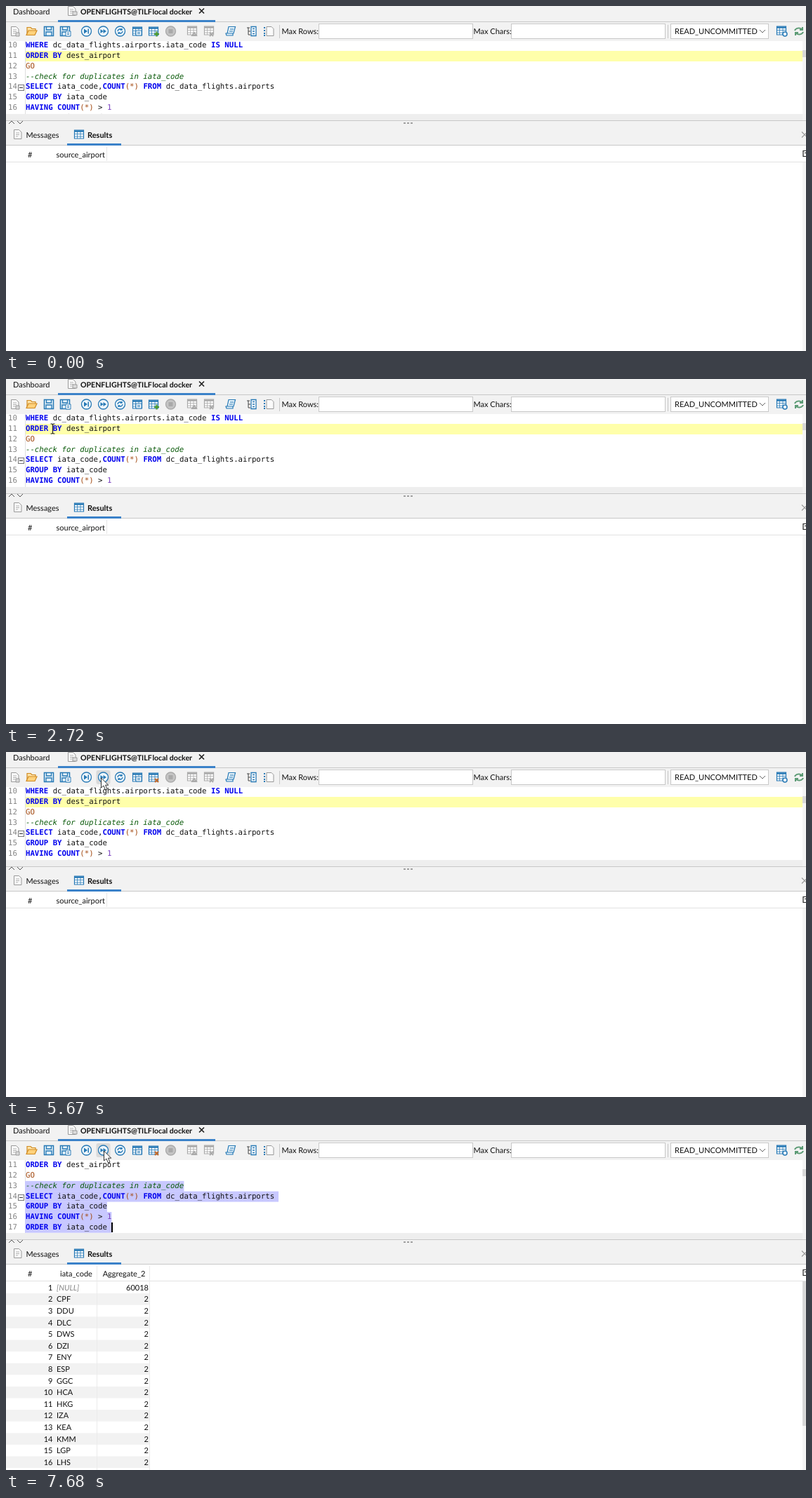
An HTML page with a canvas that plays this animation: 1139x492 px, repeating every 8 s.

```html
<!DOCTYPE html>
<html lang="en">
<head>
<meta charset="utf-8">
<title>SQL editor</title>
<style>
  html, body { margin: 0; width: 1139px; height: 492px; overflow: hidden; }
  canvas { display: block; }
</style>
</head>
<body>
<canvas id="stage" width="1139" height="492"></canvas>
<script>
const ctx = document.getElementById('stage').getContext('2d');
const LOOP = 8000;
const UI = 'Lato, "Open Sans", sans-serif';
const MONO = '"DejaVu Sans Mono", monospace';
const BLUE = '#2779b5', GRAY = '#a9a9a9', PANEL = '#f2f2f2', LINE = '#c8c8c8';
const COL = 6.44, ROW = 14.72, GRID = 16.6;

const CODE = [
  'WHERE dc_data_flights.airports.iata_code IS NULL',
  'ORDER BY dest_airport',
  'GO',
  '--check for duplicates in iata_code',
  'SELECT iata_code,COUNT(*) FROM dc_data_flights.airports',
  'GROUP BY iata_code',
  'HAVING COUNT(*) > 1',
  'ORDER BY iata_code '
];
const CODES = '[NULL] CPF DDU DLC DWS DZI ENY ESP GGC HCA HKG IZA KEA KMM LGP LHS'.split(' ');
const KEYWORD = /^(WHERE|IS|NULL|ORDER|BY|SELECT|COUNT|FROM|GROUP|HAVING)$/;

// start, end, steps, from, to, easing powers for x and y
const MOVES = [
  [270, 740, 8, [978, 480], [135, 154], 3, 1.5],
  [810, 950, 3, [135, 154], [117, 122], 1.3, 1.3],
  [1210, 1650, 7, [117, 122], [115, 36], 1.4, 1.4],
  [2170, 2720, 9, [115, 36], [66.5, 71], 1.6, 1.6],
  [2990, 3680, 11, [66.5, 71], [115, 36.5], 1.6, 1.6],
  [5610, 5810, 4, [115, 36.5], [139, 36.5], 2.6, 2]
];
const CARET = [[2920, 3480], [3940, 4400], [4880, 5410], [5950, 6410], [6610, 7220], [7680, LOOP]];
const within = (t, a, b) => t >= a && t < b;

function rect(x, y, w, h, color) {
  ctx.fillStyle = color;
  ctx.fillRect(x, y, w, h);
}

function box(x, y, w, h, fill, stroke) {
  rect(x, y, w, h, fill);
  ctx.strokeStyle = stroke;
  ctx.lineWidth = 1;
  ctx.strokeRect(x + .5, y + .5, w - 1, h - 1);
}

function text(s, x, y, { style = '', color = '#111', align = 'left', font = UI, size = 11 } = {}) {
  ctx.font = `${style} ${size}px ${font}`;
  ctx.fillStyle = color;
  ctx.textAlign = align;
  ctx.fillText(s, x, y);
}

// Draws an SVG path centred on (x, y).
function path(d, x, y, stroke, fill, width = 1.2) {
  const p = new Path2D(d);
  ctx.save();
  ctx.translate(x, y);
  if (fill) { ctx.fillStyle = fill; ctx.fill(p); }
  if (stroke) { ctx.strokeStyle = stroke; ctx.lineWidth = width; ctx.stroke(p); }
  ctx.restore();
}

function page(x, y) {
  path('M-5.5-6.5H1.5L5-3V6.5H-5.5Z', x, y, '#9a9a9a', '#f8f8f8', 1);
  path('M-3-2H2M-3 .5H2M-3 3H0', x, y, '#b5b5b5', null, 1);
}

function table(x, y, color) {
  path('M-6.5-6H6.5V6H-6.5Z', x, y, color, '#fff');
  path('M-6.5-4.5H6.5', x, y, color, null, 2.5);
  path('M-6.5-.5H6.5M-6.5 3H6.5M-2.5-4V6M2-4V6', x, y, color, null, .8);
}

function ring(x, color, glyph, filled) {
  path('M7 0A7 7 0 1 1-7 0A7 7 0 1 1 7 0', x, 36, color, color === GRAY ? '#c4c4c4' : '#eef6fb', 1.3);
  path(glyph, x, 36, filled ? null : color, filled ? color : null, 1.4);
}

function floppy(x, color) {
  path('M-6.5-6.5H6.5V6.5H-6.5Z', x, 36, color, '#e4f1f8', 1.5);
  path('M-3.5-6V-2H3.5V-6M-4 6V1H4V6', x, 36, color, null, 1.3);
}

function toolbar(busy, ran, hover) {
  rect(0, 24, 1139, 26, PANEL);
  if (hover) {
    ctx.fillStyle = '#dadada';
    ctx.beginPath();
    ctx.roundRect(hover - 10, 26, 20, 20, 3);
    ctx.fill();
  }
  const run = busy ? GRAY : BLUE;
  page(13, 36);
  path('M2 2H7V7H2Z', 12, 36, '#9a9a9a', '#d8d8d8', 1);
  path('M-7 5.5V-5.5H-2L0-3.5H5V-1', 37, 36, '#cf8a23', '#ffe3a6');
  path('M-7 5.5L-4-1H8L5 5.5Z', 36, 36, '#cf8a23', '#ffd27c');
  floppy(61, BLUE);
  floppy(84, BLUE);
  path('M0 0H7V7H0ZM2 2.5H5M2 4.5H5', 85, 36, BLUE, '#fff', 1);
  ring(114.5, run, 'M-3.5-3.5L1.5 0L-3.5 3.5ZM2-3.5H3.5V3.5H2Z', true);
  ring(138.5, run, 'M-4-3L0 0L-4 3ZM0-3L4.5 0L0 3Z', true);
  ring(162.5, run, 'M-3.5 0A3.5 3.5 0 0 1 2-2.5M3.5 0A3.5 3.5 0 0 1-2 2.5M2.5-4V-2H0M-2.5 4V2H0');
  table(187, 36, run);
  path('M-2-1H6V6H-2ZM0 1.5H4M0 3.5H4', 187, 36, run, '#fff', 1);
  table(210, 36, run);
  if (busy) path('M1 4H7', 210, 36, GRAY, null, 3);
  else if (ran) path('M2 2L7 7M7 2L2 7', 210, 36, '#c76a28', null, 2);
  else path('M1 4H8M4.5 .5V7.5', 210, 36, '#4c9a2a', null, 2.2);
  ring(234.5, busy ? BLUE : GRAY, 'M-3-3H3V3H-3Z', true);
  for (const x of [265, 289]) {
    table(x, 35, GRAY);
    path(x < 280 ? 'M0 6L3 2L6 6Z' : 'M1 2L6 7M6 2L1 7', x, 36, GRAY, null, 1.8);
  }
  path('M-3-6.5H6.5L4 3H-5ZM-7 3H3V6H-6Z', 320, 36, BLUE, '#e4f1f8');
  path('M-1-3H4M-2 0H3', 320, 36, BLUE, null, 1);
  path('M-7-5H-3M-5-5V5H-2M-5 0H-2', 350, 36, '#444', null, 1);
  path('M-1-6.5H6V6.5H-1ZM1-3.5H4M1 0H4M1 3.5H4', 350, 36, BLUE, '#fff', 1.3);
  path('M-3-6.5H4L7-3.5V6.5H-3Z', 374, 36, '#999', '#fafafa', 1);
  path('M-6-6V-4M-6-2V0M-6 2V4M-6 5V7', 374, 36, BLUE, null, 2);
  rect(389, 27, 1, 19, LINE);
  text('Max Rows:', 392.5, 40);
  box(445, 25, 220, 22, '#fff', LINE);
  text('Max Chars:', 665.5, 40);
  box(719, 25, 220, 22, '#fff', LINE);
  rect(942, 27, 1, 19, LINE);
  box(946, 25, 140, 22, '#fff', LINE);
  text('READ_UNCOMMITTED', 952, 40);
  path('M-4-2L0 2L4-2', 1077, 36, '#666', null, 1);
  table(1104, 35, BLUE);
  path('M7 4A3 3 0 1 1 1 4A3 3 0 1 1 7 4', 1105, 36, BLUE, '#fff', 1.5);
  path('M-6-1A6 5 0 0 1 4-3M6 1A6 5 0 0 1-4 3M5-6V-2H1M-5 6V2H-1', 1129, 36, '#5c9b75', null, 2);
}

function tabs() {
  rect(0, 0, 1139, 24, PANEL);
  rect(0, 22, 1139, 1, LINE);
  rect(74, 20, 224, 3, '#3b82c9');
  text('Dashboard', 10, 12);
  page(94, 7);
  path('M1 1H7V6H1Z', 94, 7, '#9a9a9a', '#ddd', 1);
  const bold = { style: 'bold', size: 10.6 };
  text('OPENFLIGHTS@TILF', 106, 12, bold);
  text('local docker', 265, 12, { ...bold, align: 'right' });
  path('M-3.5-3.5L3.5 3.5M3.5-3.5L-3.5 3.5', 278.5, 7, '#222', null, 1.7);
}

function codeLine(s, y) {
  if (s.startsWith('--')) {
    text(s, 28, y, { font: MONO, size: 10.7, style: 'italic', color: '#0a5a0a' });
    return;
  }
  for (const { 0: token, index } of s.matchAll(/\w[\w.]*|[^\w\s]/g)) {
    const keyword = KEYWORD.test(token);
    const color = keyword ? '#0000ee' : token === '1' ? '#7a3fc0'
      : /^(GO|[()*])$/.test(token) ? '#a34a12' : '#111';
    text(token, 28 + index * COL, y, { font: MONO, size: 10.7, style: keyword ? 'bold' : '', color });
  }
}

function editor(selected, caret) {
  ctx.save();
  ctx.beginPath();
  ctx.rect(0, 50, 1139, 104);
  ctx.clip();
  rect(0, 50, 1139, 104, '#fff');
  if (!selected) rect(27, 64, 1107, 15, '#ffffaa');
  rect(27, 50, 1, 104, '#dedede');
  CODE.forEach((s, i) => {
    const y = (selected ? 45.7 : 59.4) + i * ROW;
    if (selected && i > 2) {
      const end = i === 4 ? 388 : 28 + s.length * COL;
      rect(27, y - 10, end - 27, ROW + .3, '#c8c8ff');
    }
    text(10 + i, 3, y, { font: MONO, size: 10.7, color: '#858585' });
    codeLine(s, y);
    if (i === 4) {
      const top = Math.round(y - 6);
      box(17, top, 9, 9, '#fff', '#777');
      rect(19, top + 4, 5, 1, '#333');
    }
  });
  if (caret) selected ? rect(150, 139, 2, 14, '#000') : rect(66, 64, 2, 14, '#000');
  rect(1134, 50, 5, 104, '#f5f5f5');
  rect(1134, 63, 5, 10, '#d8d8d8');
  ctx.restore();
}

function resultPanel(busy, filled, hoverTab) {
  rect(0, 154, 1139, 338, PANEL);
  rect(0, 154, 1134, 9, '#eeeeee');
  rect(0, 163, 1139, 1, LINE);
  path('M-4 2L0-2L4 2', 8, 166, '#555', null, 1);
  path('M-4-2L0 2L4-2', 20, 166, '#555', null, 1);
  for (const x of [566, 571, 576]) rect(x, 166, 3, 2, '#a0a0a0');
  if (hoverTab) rect(87, 169, 77, 29, '#e0e0e0');
  rect(0, 198, 1139, 1, LINE);
  page(17, 183);
  text('Messages', 28.5, 188, { style: busy ? 'bold' : '' });
  path('M-4-4L4 4M4-4L-4 4', 1137, 183.5, busy ? '#222' : '#999', null, 1.2);
  if (busy) {
    rect(0, 196, 88, 3, '#3b82c9');
    return;
  }
  table(104, 183, BLUE);
  text('Results', 116, 188, { style: 'bold' });
  rect(87, 196, 77, 3, '#3b82c9');
  rect(0, 199, 1139, 293, '#fff');
  rect(0, 222, 1139, 1, '#e2e2e2');
  rect(1134, 223, 5, 269, '#f5f5f5');
  path('M-3-4H4V4H-3ZM-1-1H4', 1138, 210.5, '#222', '#fff', 1.2);
  text('#', 31, 215.5);
  if (!filled) {
    text('source_airport', 71.5, 215.5);
    rect(143, 201, 1, 20, '#e6e6e6');
    return;
  }
  text('iata_code', 100, 215.5, { align: 'center' });
  text('Aggregate_2', 168, 215.5, { align: 'center' });
  rect(1134, 223, 5, 206, '#d8d8d8');
  CODES.forEach((code, i) => {
    const y = 235.8 + i * GRID;
    if (i % 2) rect(0, y - 12.3, 205, GRID, PANEL);
    text(i + 1, 66.5, y, { align: 'right' });
    text(code, 72, y, i ? {} : { style: 'italic', color: '#888' });
    text(i ? 2 : 60018, 203, y, { align: 'right' });
  });
  rect(129, 201, 1, 291, '#ebebeb');
  rect(204, 201, 1, 291, '#ebebeb');
}

function pointerAt(t) {
  let pos = null;
  for (const [start, end, steps, from, to, px, py] of MOVES) {
    if (t < start) break;
    const k = Math.min(steps - 1, Math.floor((t - start) / (end - start) * (steps - 1) + .3));
    const rest = 1 - (start === 270 ? k / (steps - 1) : (k + 1) / steps);
    pos = [to[0] + (from[0] - to[0]) * rest ** px, to[1] + (from[1] - to[1]) * rest ** py];
  }
  return pos;
}

function pointer([x, y]) {
  if (within(y, 53, 150)) {
    path('M-3-7H-1L0-6L1-7H3M0-6V6M-3 7H-1L0 6L1 7H3', x, y, '#222', null, 1.2);
  } else {
    path('M0 0V14L3.4 11L6 17L8.5 16L6 10.2H10.2Z', x + .5, y + .5, '#333', '#fff', 1);
  }
}

function draw(t) {
  const busy = within(t, 4670, 4880) || within(t, 6610, 6760);
  const selected = t >= 6610;
  const pos = pointerAt(t);
  let hover = 0, hoverTab = false;
  if (pos) {
    const [x, y] = pos;
    if (!busy && within(y, 26, 46)) hover = within(x, 104, 126) ? 114.5 : within(x, 128, 150) ? 138.5 : 0;
    hoverTab = within(x, 87, 164) && within(y, 169, 198);
  }
  ctx.textRendering = 'geometricPrecision';
  tabs();
  toolbar(busy, t >= 4880, hover);
  editor(selected, CARET.some(([a, b]) => within(t, a, b)));
  resultPanel(busy, selected, hoverTab);
  if (pos) pointer(pos);
}

function frame() {
  draw(performance.now() % LOOP);
  requestAnimationFrame(frame);
}
frame();
</script>
</body>
</html>
```
